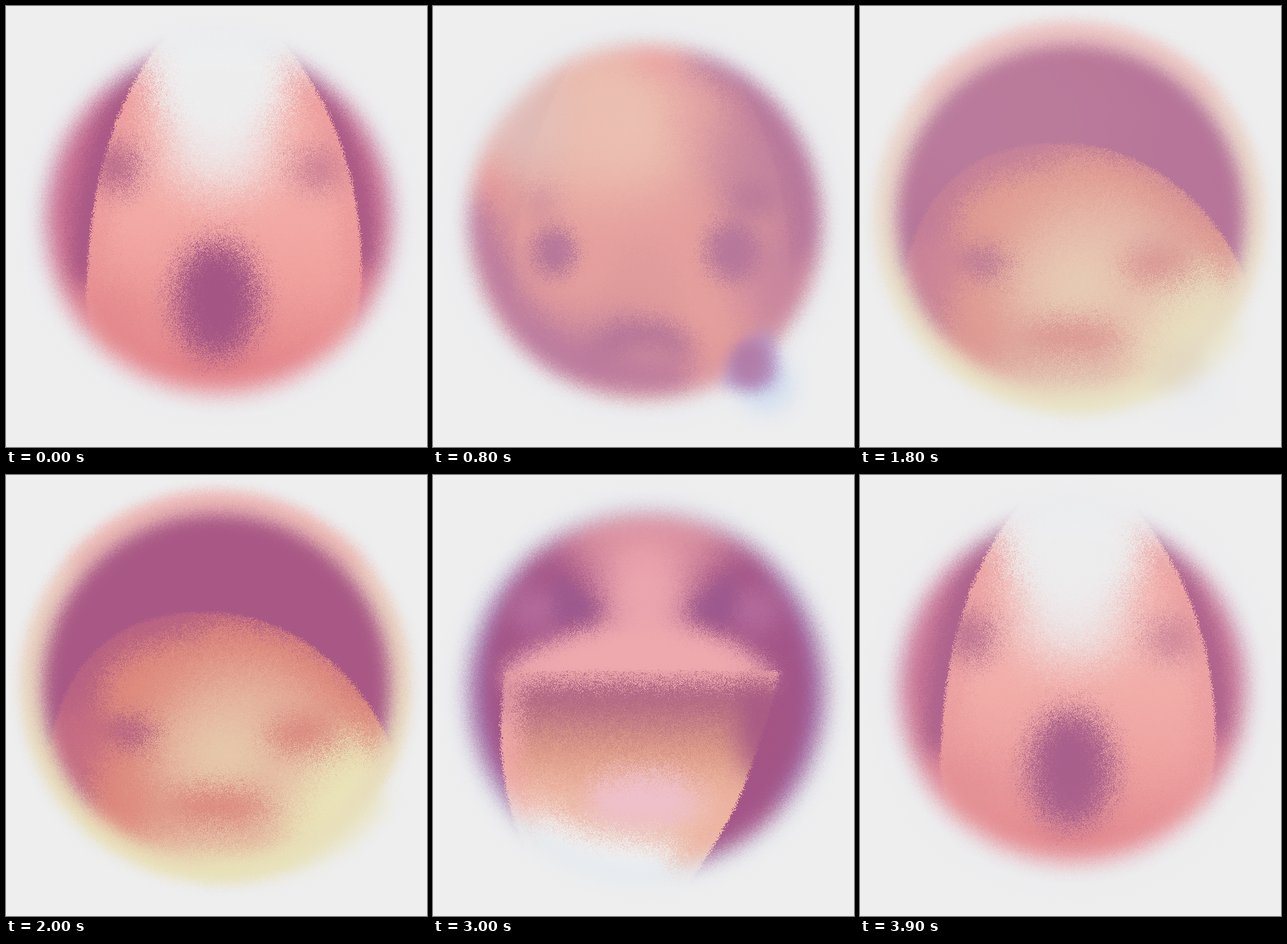
These frames come from a looping animation (516 by 540 pixels, 4 s). An HTML page with a canvas:

```html
<!DOCTYPE html>
<html lang="en">
<head>
<meta charset="utf-8">
<title>Moods</title>
<style>
  html, body { margin: 0; width: 100%; height: 100%; overflow: hidden; background: #eeeeef; }
  canvas { display: block; width: 516px; height: 540px; }
</style>
</head>
<body>
<canvas id="stage" width="516" height="540"></canvas>
<script>
const W = 516, H = 540, BG = '#eeeeef', PLUM = '#a45584';

function layer() {
  const canvas = document.createElement('canvas');
  canvas.width = W;
  canvas.height = H;
  return canvas.getContext('2d', { willReadFrequently: true });
}

function soft(c, blur, alpha, draw) {
  c.save();
  c.filter = blur ? `blur(${blur}px)` : 'none';
  c.globalAlpha = alpha;
  draw();
  c.restore();
}

function oval(c, color, x, y, rx, ry, blur, alpha = 1, turn = 0) {
  soft(c, blur, alpha, () => {
    c.fillStyle = color;
    c.beginPath();
    c.ellipse(x, y, rx, ry, turn, 0, Math.PI * 2);
    c.fill();
  });
}

function shape(c, color, d, blur, alpha = 1) {
  soft(c, blur, alpha, () => {
    c.fillStyle = color;
    c.fill(new Path2D(d));
  });
}

function line(c, color, d, width, blur, alpha = 1) {
  soft(c, blur, alpha, () => {
    c.strokeStyle = color;
    c.lineWidth = width;
    c.lineCap = c.lineJoin = 'round';
    c.stroke(new Path2D(d));
  });
}

function ramp(c, y0, y1, ...colors) {
  const g = c.createLinearGradient(0, y0, 0, y1);
  colors.forEach((color, i) => g.addColorStop(i / (colors.length - 1), color));
  return g;
}

function flood(c, color) {
  c.fillStyle = color;
  c.fillRect(0, 0, W, H);
}

function randomizer(seed) {
  return () => {
    seed = seed + 0x6d2b79f5 | 0;
    let t = Math.imul(seed ^ seed >>> 15, 1 | seed);
    t = t + Math.imul(t ^ t >>> 7, 61 | t) ^ t;
    return ((t ^ t >>> 14) >>> 0) / 4294967296;
  };
}

const rnd = randomizer(11);

// Grain: every pixel takes its colour from a random close neighbour.
function scatter(c, reach) {
  const from = new Uint32Array(c.getImageData(0, 0, W, H).data.buffer);
  const out = c.createImageData(W, H);
  const to = new Uint32Array(out.data.buffer);
  const near = (v, max) => Math.min(max - 1, Math.max(0, Math.round(v + (rnd() + rnd() - 1) * reach)));
  for (let y = 0; y < H; y++) {
    for (let x = 0; x < W; x++) to[y * W + x] = from[near(y, H) * W + near(x, W)];
  }
  c.putImageData(out, 0, 0);
}

// Coarse grain within a crisp outline.
function inside(c, d, draw) {
  const inner = layer();
  draw(inner);
  scatter(inner, 22);
  scatter(c, 10);
  c.save();
  c.clip(new Path2D(d));
  c.drawImage(inner.canvas, 0, 0);
  c.restore();
}

function face({ x, y, r, edge, halo, draw, under, over }) {
  const base = layer(), skin = layer();
  flood(base, BG);
  oval(base, halo, x, y, r + 14, r + 14, 13, 0.8);
  if (under) under(base);
  draw(skin);
  skin.globalCompositeOperation = 'destination-in';
  oval(skin, '#000', x, y, r, r, edge);
  base.drawImage(skin.canvas, 0, 0);
  if (over) over(base);
  scatter(base, 4);
  return base.canvas;
}

function shout(c) {
  const petal = 'M206 28 C150 80 102 190 99 350 C98 410 130 500 262 510 C400 500 437 400 436 320 C435 190 385 90 324 28 Z';
  flood(c, ramp(c, 250, 430, '#cb7091', '#e4868f'));
  line(c, PLUM, 'M165 70 C125 140 98 215 95 325', 36, 13);
  line(c, PLUM, 'M365 72 C410 145 436 210 441 310', 30, 12);
  inside(c, petal, p => {
    flood(p, ramp(p, 220, 450, '#f4aea9', '#f0a19e', '#e3848a'));
    line(p, '#e2858d', 'M175 70 C125 150 104 240 100 400', 20, 12, 0.7);
    line(p, '#e2858d', 'M355 70 C415 150 435 240 434 390', 20, 12, 0.7);
    oval(p, '#dc7d86', 135, 375, 35, 50, 24, 0.5);
    oval(p, BG, 262, 80, 88, 90, 17);
    oval(p, BG, 262, 175, 68, 55, 24, 0.85);
    oval(p, PLUM, 136, 198, 27, 28, 14, 0.8);
    oval(p, PLUM, 382, 201, 27, 23, 15, 0.6);
    oval(p, PLUM, 258, 360, 52, 72, 13);
  });
  line(c, '#f0a0ad', 'M130 435 C200 490 320 490 395 435', 18, 12, 0.7);
}

function gloom(c) {
  flood(c, '#e38d8a');
  oval(c, '#ebb09d', 195, 140, 140, 95, 32);
  oval(c, '#debbb5', 110, 135, 55, 75, 28, 0.8);
  oval(c, '#ea8d8b', 285, 60, 38, 32, 15, 0.9);
  oval(c, '#e58c8b', 318, 125, 26, 60, 20, 0.8);
  oval(c, '#e88986', 65, 222, 32, 22, 14, 0.8);
  oval(c, '#be6f8b', 395, 185, 58, 75, 26);
  oval(c, '#bd6b8b', 425, 345, 48, 75, 24);
  line(c, '#a65787', 'M345 58 C430 105 470 190 462 290', 62, 18);
  oval(c, '#c3728b', 175, 420, 90, 45, 26);
  line(c, '#a95a8c', 'M44 255 C65 290 75 345 108 385 C148 440 215 460 310 455', 48, 17, 0.95);
  oval(c, PLUM, 132, 242, 20, 18, 13, 0.45);
  oval(c, PLUM, 393, 238, 36, 22, 14, 0.85);
  oval(c, PLUM, 148, 301, 27, 32, 9);
  oval(c, PLUM, 368, 300, 34, 38, 10);
  line(c, PLUM, 'M205 419 C225 396 280 394 303 417', 32, 12, 0.95);
  oval(c, '#e08a92', 330, 462, 22, 30, 12, 0.55);
  scatter(c, 14);
}

function tear(c) {
  const drop = 'M412 393 C385 405 365 435 352 462 C372 472 400 476 418 462 C428 440 418 415 412 393 Z';
  oval(c, '#c3d6f0', 408, 463, 34, 34, 13, 0.85);
  shape(c, '#a276bd', drop, 9, 0.85);
  oval(c, '#9f5892', 388, 438, 24, 28, 9, 0.95);
}

function swoon(c) {
  const cap = 'M55 330 C70 235 130 168 243 168 C365 168 455 265 476 350 L516 380 L516 540 L0 540 L0 330 Z';
  flood(c, '#a95885');
  inside(c, cap, p => {
    flood(p, '#b86283');
    shape(p, '#de8a7d', 'M115 265 C150 200 240 185 320 195 C400 210 460 290 500 350 L500 540 L60 540 L112 390 Z', 14);
    oval(p, '#ca7183', 90, 325, 40, 38, 18, 0.9);
    oval(p, '#de8a7d', 180, 255, 48, 28, 16);
    oval(p, '#e5b6a2', 295, 350, 120, 115, 30);
    oval(p, '#e4baa2', 215, 475, 75, 45, 22);
    oval(p, '#e9e3b8', 410, 420, 68, 118, 24, 1, 0.45);
    oval(p, '#e7d8b0', 270, 345, 55, 40, 28, 0.7);
    oval(p, '#e8dfb8', 300, 490, 100, 30, 20);
    line(p, '#de8a7d', 'M250 193 C350 195 430 265 470 340', 22, 10, 0.85);
    oval(p, '#b15f84', 150, 315, 29, 17, 10);
    oval(p, '#d97f79', 362, 316, 42, 20, 14, 0.95);
    oval(p, '#da8078', 258, 404, 64, 18, 13, 0.95);
    oval(p, '#de8a7d', 130, 385, 24, 48, 18, 0.8, -0.4);
  });
}

function ring(c) {
  soft(c, 7, 1, () => {
    c.fillStyle = ramp(c, 15, 500, '#efc2c1', '#e9cfc0', '#e8dcc0', '#e9e2ba');
    c.beginPath();
    c.arc(257, 259, 240, 0, Math.PI * 2);
    c.fill();
  });
  line(c, '#e8a3a3', 'M90 110 C180 15 335 15 425 110', 20, 12, 0.6);
}

// Warm rim where the cheek runs into the ring.
function rim(c) {
  line(c, '#e8e2b9', 'M458 400 C415 460 345 487 255 486', 18, 11, 0.8);
}

function laugh(c) {
  const jaw = 'M88 240 C78 320 82 390 112 455 L112 540 L285 540 C315 498 355 445 380 385 C396 340 415 290 425 240 Z';
  const cheeks = 'M88 235 C150 190 205 180 260 178 C320 180 370 195 415 240 L415 262 L88 262 Z';
  flood(c, '#a45588');
  oval(c, '#d98f9f', 262, 75, 105, 60, 24);
  oval(c, '#eba5ae', 260, 150, 56, 70, 20);
  shape(c, '#eda9ae', cheeks, 11);
  line(c, '#966cb2', 'M92 110 C35 190 35 310 85 400', 20, 12, 0.75);
  line(c, '#966cb2', 'M420 110 C490 190 485 310 435 400', 20, 12, 0.65);
  oval(c, '#b874a2', 126, 165, 32, 28, 15, 0.8);
  oval(c, '#b874a2', 394, 165, 32, 28, 15, 0.8);
  shape(c, '#98588f', 'M150 118 L205 160 L196 180 L150 180 Z', 9, 0.75);
  shape(c, '#98588f', 'M370 118 L314 158 L322 180 L368 180 Z', 9, 0.75);
  inside(c, jaw, p => {
    flood(p, '#e9a3a8');
    shape(p, ramp(p, 255, 420, '#a85a83', '#bf7884', '#dc9a88', '#eab19c', '#eebdaa'),
      'M106 256 L470 256 L470 540 L106 540 Z', 8);
    line(p, PLUM, 'M78 225 L76 290', 14, 9, 0.6);
    line(p, '#f0a8a2', 'M86 320 C84 360 92 410 115 455', 26, 10, 0.95);
    line(p, '#edb0a0', 'M378 385 C355 440 325 480 290 520', 30, 10, 0.95);
    oval(p, '#f2c4bc', 125, 425, 32, 45, 18, 0.8);
    oval(p, '#eec0cb', 258, 398, 72, 34, 13);
    shape(p, BG, 'M125 405 C170 440 240 447 300 450 L285 540 L100 540 L112 460 Z', 13);
  });
  oval(c, PLUM, 402, 315, 28, 58, 16, 0.9);
  // The jaw is open at the chin.
  oval(c, BG, 205, 492, 74, 24, 10);
}

const faces = [
  face({ x: 261, y: 263, r: 212, edge: 13, halo: '#e9eef2', draw: shout }),
  face({ x: 260, y: 265, r: 217, edge: 11, halo: '#e5ebf0', draw: gloom, over: tear }),
  face({ x: 258, y: 260, r: 213, edge: 10, halo: '#ecedf2', draw: swoon, under: ring, over: rim }),
  face({ x: 262, y: 265, r: 217, edge: 13, halo: '#dfe9f0', draw: laugh })
];

const HOLD = 500, STEP = 100, STEPS = 6, PART = 1000;
const stage = document.getElementById('stage').getContext('2d');
const start = performance.now();
const ease = k => k * k * (3 - 2 * k);
let shown = '';

function put(i, alpha) {
  stage.globalAlpha = alpha;
  stage.drawImage(faces[i % faces.length], 0, 0);
}

function frame(now) {
  const t = Math.max(0, now - start) % (PART * faces.length);
  const i = Math.floor(t / PART);
  const local = t % PART;
  const step = local < HOLD ? 0 : Math.floor((local - HOLD) / STEP) + 1;
  const key = i + ':' + step;
  if (key !== shown) {
    shown = key;
    const k = ease(step / STEPS);
    stage.globalAlpha = 1;
    flood(stage, BG);
    // One face fades out while the next fades in, so the ground shines through.
    put(i, 1 - k);
    put(i + 1, k);
  }
  requestAnimationFrame(frame);
}
frame(start);
</script>
</body>
</html>
```
